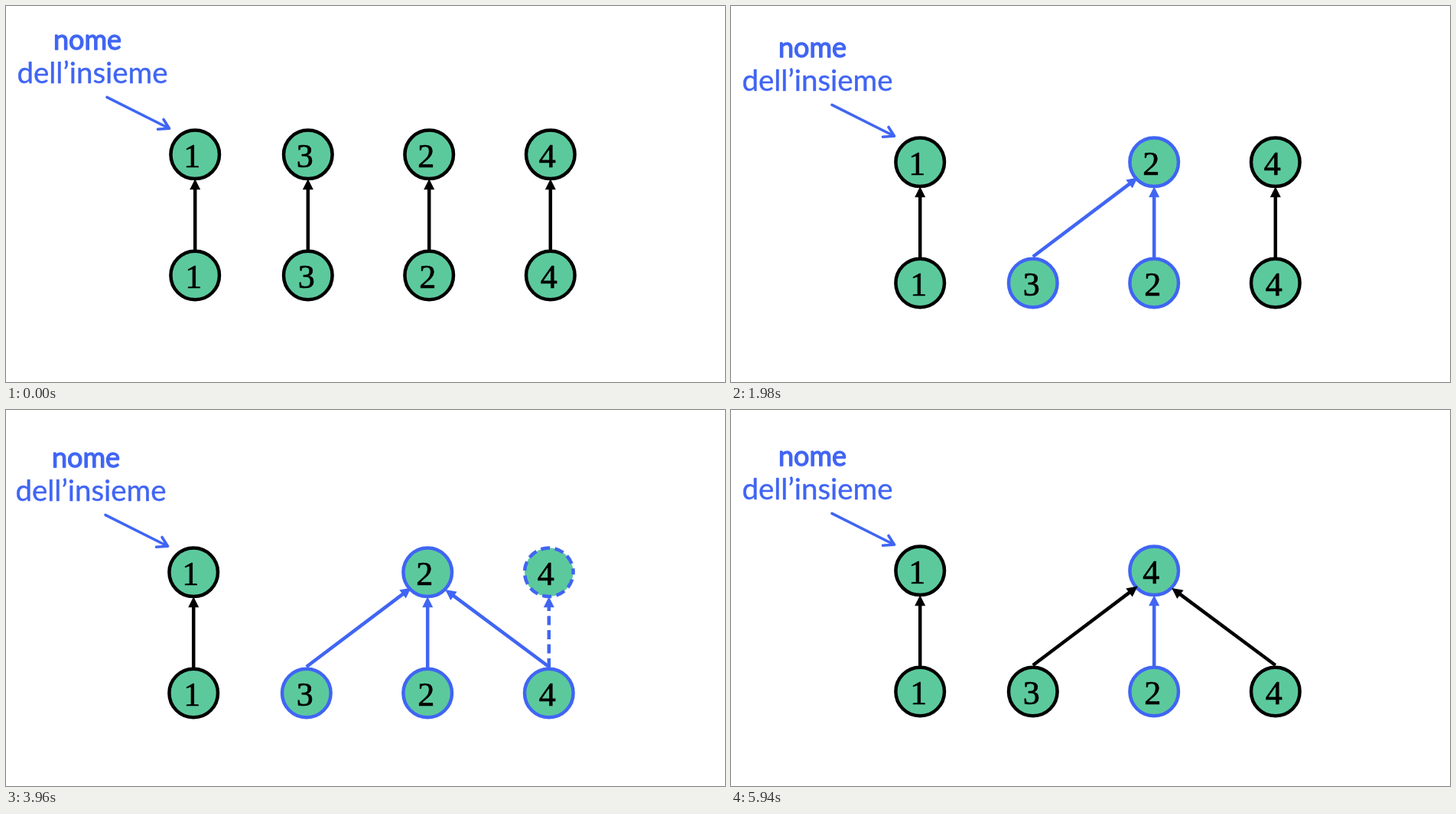
An HTML page with a canvas for the animation above (6600 ms loop, 940 px wide and 492 px high).

```html
<!DOCTYPE html>
<html lang="it">
<head>
<meta charset="utf-8">
<title>Union di insiemi</title>
<style>
html, body { margin: 0; width: 100%; height: 100%; overflow: hidden; background: #fff; }
canvas { display: block; }
</style>
</head>
<body>
<canvas id="stage" width="940" height="492"></canvas>
<script>
const ctx = document.getElementById('stage').getContext('2d');
const BLUE = '#4065f3', BLACK = '#000', GREEN = '#5cc99d';
const STEP = 660, TOP = 194.3, GAP = 158.2, LINE = 4.5;
const DASH = [12, 6.5];
const X = { 1: 247.2, 3: 394.8, 2: 553.2, 4: 711.8 };

// dx, dy: slide offset; blue: highlighted columns; union: columns joined to 2;
// ghost: column whose old root is dashed; name: label of the joined root
const steps = [
  { dy: 0 },
  { dy: 14, blue: [3, 2] },
  { dy: 10, blue: [3, 2], union: [3], ghost: 3 },
  { dy: 10, blue: [3, 2], union: [3] },
  { dy: 24, union: [3] },
  { dx: 2, dy: 18, blue: [3, 2, 4], union: [3] },
  { dx: -2, dy: 18, blue: [3, 2, 4], union: [3, 4], ghost: 4 },
  { dx: 2, dy: 30, blue: [3, 2, 4], union: [3, 4], ghost: 4, name: 4 },
  { dx: 2, dy: 10, blue: [3, 2, 4], union: [3, 4], name: 4 },
  { dy: 16, blue: [2], union: [3, 4], name: 4 }
];

// A thin outline adds a little weight and softens the letter ends.
function write(text, x, y, font, color, weight) {
  ctx.font = font;
  ctx.fillStyle = ctx.strokeStyle = color;
  ctx.lineWidth = weight;
  ctx.lineJoin = 'round';
  ctx.fillText(text, x, y);
  ctx.strokeText(text, x, y);
}

function node(x, y, label, color, labelX, labelY, dashed) {
  ctx.beginPath();
  ctx.arc(x, y, 31.8, 0, Math.PI * 2);
  ctx.fillStyle = GREEN;
  ctx.fill();
  ctx.strokeStyle = color;
  ctx.lineWidth = LINE;
  ctx.setLineDash(dashed ? DASH : []);
  ctx.lineDashOffset = 9;
  ctx.stroke();
  ctx.setLineDash([]);
  ctx.lineDashOffset = 0;
  write(label, x + labelX, y + labelY,
    '44px "Liberation Serif", "Times New Roman", serif', BLACK, 0.7);
}

function arrow(x1, y1, x2, y2, color, dashed) {
  const len = Math.hypot(x2 - x1, y2 - y1);
  ctx.save();
  ctx.translate(x1, y1);
  ctx.rotate(Math.atan2(y2 - y1, x2 - x1));
  ctx.strokeStyle = ctx.fillStyle = color;
  ctx.lineWidth = LINE;
  ctx.setLineDash(dashed ? DASH : []);
  ctx.beginPath();
  ctx.moveTo(0, 0);
  ctx.lineTo(len - 12, 0);
  ctx.stroke();
  ctx.beginPath();
  ctx.moveTo(len, 0);
  ctx.lineTo(len - 14, -7);
  ctx.lineTo(len - 14, 7);
  ctx.fill();
  ctx.restore();
}

function caption() {
  const family = 'px Lato, "Noto Sans", sans-serif';
  write('nome', 106.5, 57, 36 + family, BLUE, 1.3);
  write('dell’insieme', 113, 101, 38.5 + family, BLUE, 0.4);
  ctx.lineCap = 'round';
  ctx.lineWidth = 3.6;
  ctx.beginPath();
  ctx.moveTo(132, 119.4);
  ctx.lineTo(213, 160);
  ctx.moveTo(206, 148.5);
  ctx.lineTo(213.5, 160.3);
  ctx.lineTo(198.5, 161.2);
  ctx.stroke();
  ctx.lineCap = 'butt';
}

function draw({ dx = 0, dy, blue = [], union = [], ghost, name = 2 }) {
  ctx.fillStyle = '#fff';
  ctx.fillRect(0, 0, 940, 492);
  if (dx > 0) {
    ctx.fillStyle = '#444';
    ctx.fillRect(0, 0, 2, 492);
  }
  ctx.save();
  ctx.translate(dx, dy);
  ctx.textAlign = 'center';
  caption();

  const cols = [1, 3, 2, 4];
  const color = n => blue.includes(n) ? BLUE : BLACK;
  const rooted = n => !union.includes(n) || ghost === n;
  for (const n of cols) {
    if (rooted(n)) node(X[n], TOP, n === 2 ? name : n, color(n), -4, 17, ghost === n);
    node(X[n], TOP + GAP, n, color(n), -2, 16, false);
  }
  for (const n of cols) {
    if (rooted(n)) arrow(X[n], TOP + 124.7, X[n], TOP + 32, color(n), ghost === n);
    if (union.includes(n)) {
      const left = n === 3;
      arrow(X[n], TOP + 123.7, X[2] + (left ? -21.5 : 23), TOP + (left ? 20.3 : 22.7), color(n));
    }
  }
  ctx.restore();
}

function tick() {
  draw(steps[Math.floor(performance.now() / STEP) % steps.length]);
  requestAnimationFrame(tick);
}
tick();
</script>
</body>
</html>
```
